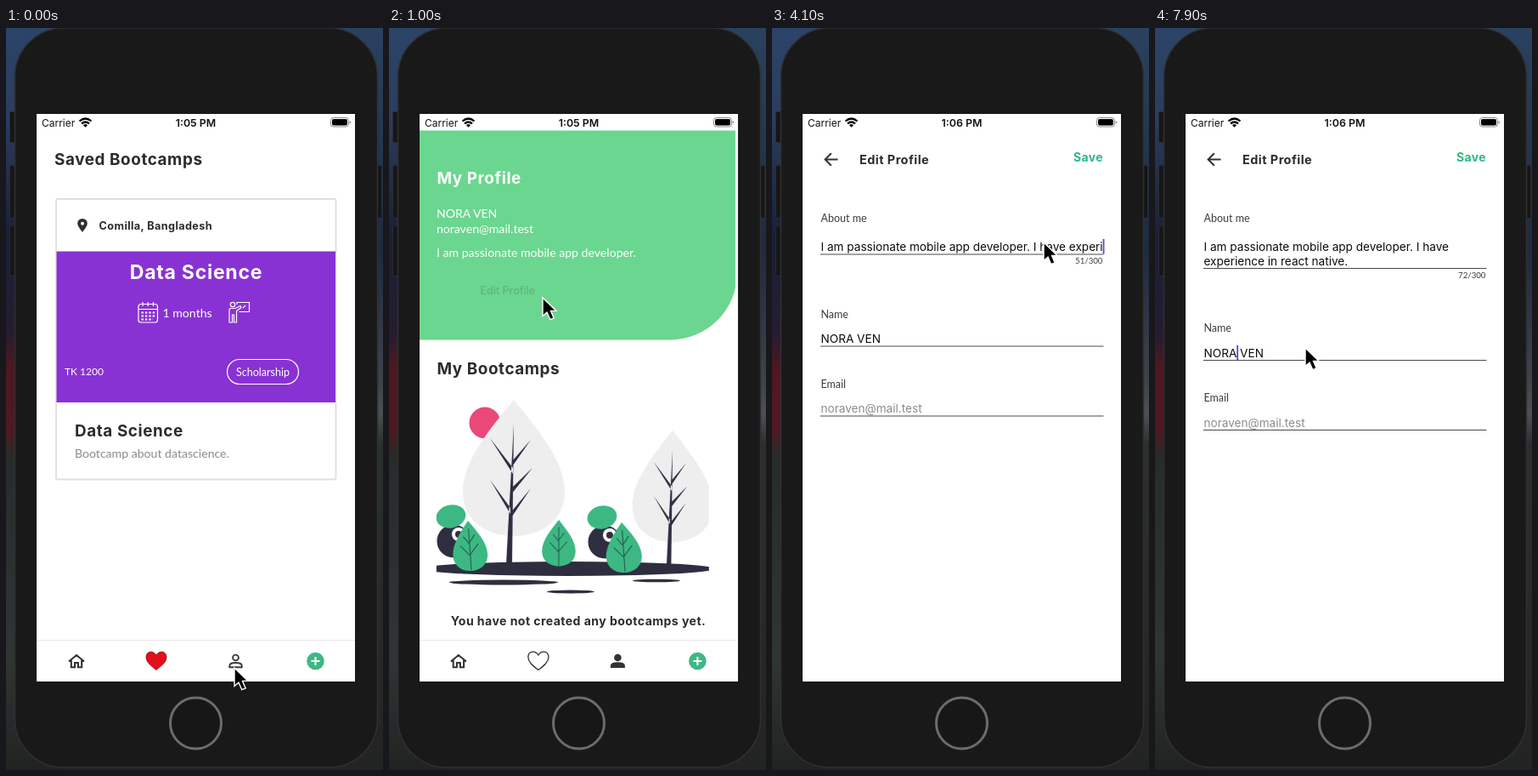
An HTML page for the animation above (8000 ms loop, 444 px wide and 872 px high).

```html
<!DOCTYPE html>
<html lang="en">
<head>
<meta charset="utf-8">
<title>Bootcamp app</title>
<style>
html, body { margin: 0; width: 100%; height: 100%; overflow: hidden; background: #111; }
svg { display: block; width: 444px; height: 872px; }
text { font-family: Inter, sans-serif; fill: #111; white-space: pre; }
.h { font-weight: 700; font-size: 18.9px; letter-spacing: .03em; fill: #2c2c2e; }
.b { font-family: Lato, sans-serif; font-size: 14.1px; }
.label { font-family: Lato, sans-serif; font-size: 12.5px; fill: #3c3c3c; }
.in { font-size: 13.6px; fill: #0c0c0c; }
.w { fill: #fff; }
.icon { fill: none; stroke: #fff; stroke-width: 1.2; }
.rule { stroke: #4a4a4a; stroke-width: 1.1; }
.dark { fill: #2f2e41; }
.green { fill: #3db883; }
.caret { fill: #5a43e0; }

.a { animation: 8s step-end infinite; }
#saved { animation-name: saved; }
#profile { animation-name: profile; }
#early { animation-name: early; }
#late { animation-name: late; }
#aboutCaret { animation-name: aboutCaret; }
#nameEnd { animation-name: nameEnd; }
#nameMid { animation-name: nameMid; }
#under { animation: under 8s infinite; }
#edit { animation: edit 8s infinite; }
#press { animation: press 8s linear infinite; }
#pointer { animation: pointer 8s ease-in-out infinite; }

@keyframes saved { 0% { visibility: visible } 2.5%, 100% { visibility: hidden } }
@keyframes profile { 0% { visibility: hidden } 2.5% { visibility: visible } 18.75%, 100% { visibility: hidden } }
@keyframes early { 0% { visibility: visible } 40%, 100% { visibility: hidden } }
@keyframes late { 0% { visibility: hidden } 40%, 100% { visibility: visible } }
@keyframes aboutCaret { 0% { visibility: hidden } 32.5% { visibility: visible } 93.75%, 100% { visibility: hidden } }
@keyframes nameEnd { 0% { visibility: hidden } 96.25% { visibility: visible } 98.75%, 100% { visibility: hidden } }
@keyframes nameMid { 0% { visibility: hidden } 98.75%, 100% { visibility: visible } }
@keyframes under {
  0%, 12.5% { transform: none; animation-timing-function: cubic-bezier(.2,.8,.2,1) }
  17.5%, 100% { transform: translateX(-112px) }
}
@keyframes edit {
  0%, 12.5% { transform: translateX(376px); animation-timing-function: cubic-bezier(.2,.8,.2,1) }
  17.5%, 100% { transform: none }
}
@keyframes press { 0%, 9.5% { opacity: .6 } 11.25%, 100% { opacity: .16 } }
@keyframes pointer {
  0%, 2.5% { transform: translate(269px, 752px) }
  10.5%, 12.5% { transform: translate(181px, 317px) }
  18%, 22.5% { transform: translate(153px, 420px) }
  31.25%, 83.75% { transform: translate(320px, 252px) }
  93.5%, 100% { transform: translate(177px, 376px) }
}
</style>
</head>
<body>
<svg viewBox="0 0 444 872">
<defs>
  <linearGradient id="left" x2="0" y2="1">
    <stop offset="0" stop-color="#2b4468"/><stop offset=".12" stop-color="#2c3d5e"/>
    <stop offset=".28" stop-color="#182038"/><stop offset=".41" stop-color="#241c30"/>
    <stop offset=".46" stop-color="#4f1820"/><stop offset=".54" stop-color="#501820"/>
    <stop offset=".58" stop-color="#262c2a"/><stop offset=".85" stop-color="#2f3532"/>
    <stop offset="1" stop-color="#202322"/>
  </linearGradient>
  <linearGradient id="right" x2="0" y2="1">
    <stop offset="0" stop-color="#29425f"/><stop offset=".3" stop-color="#1e2a40"/>
    <stop offset=".48" stop-color="#3e444c"/><stop offset=".52" stop-color="#4c5054"/>
    <stop offset=".56" stop-color="#2b302f"/><stop offset="1" stop-color="#222423"/>
  </linearGradient>
  <clipPath id="screen"><rect x="36" y="120.6" width="375" height="647.4"/></clipPath>
  <clipPath id="art"><rect x="57" y="430" width="321" height="240"/></clipPath>
  <path id="leaf" d="M0 0C28 34 60 72 60 108C60 142 32 160 0 160S-60 142-60 108C-60 72-28 34 0 0Z"/>
  <path id="veins" class="dark" d="M0 28L-2 194H-9Z
    M20 47L-1 77V71Z M-28 45L-1 87V80Z M22 80L-3 111V104Z M-28 94L-4 134V127Z M20 104L-4 140V133Z"/>
  <g id="sprout"><use href="#leaf" class="green"/>
    <path d="M0 25V158M0 70L20 45M0 75L-20 50M0 108L30 75M0 112L-32 78" fill="none" stroke="#24594f" stroke-width="3"/></g>
  <g id="buddy">
    <circle class="dark" r="19.5"/>
    <ellipse class="green" cx="-3" cy="-29" rx="17.500" ry="13.500" transform="rotate(-12 -3 -29)"/>
    <circle class="w" cx="6" cy="-8" r="8"/><circle class="dark" cx="6" cy="-8" r="4"/>
  </g>
  <path id="heart" d="M0 10.5C-7 5-12 1-12-4.5C-12-12-3.5-13 0-7C3.5-13 12-12 12-4.5C12 1 7 5 0 10.5Z"/>
</defs>

<rect width="222" height="872" fill="url(#left)"/>
<rect x="222" width="222" height="872" fill="url(#right)"/>
<g fill="#161617" stroke="#2a2a2c">
  <rect x="4.5" y="98.5" width="9" height="36" rx="2"/>
  <rect x="4.5" y="161.5" width="9" height="62" rx="2"/>
  <rect x="4.5" y="232.5" width="9" height="59" rx="2"/>
  <rect x="433" y="161.5" width="9.500" height="62" rx="2"/>
</g>
<rect x="10.500" y="0" width="427" height="869" rx="57" fill="#19191a" stroke="#303032" stroke-width="1.500"/>
<circle cx="223.500" cy="817" r="30" fill="#171718" stroke="#6c6c6e" stroke-width="3"/>
<rect x="36" y="101" width="375" height="667" fill="#fff"/>

<!-- status bar -->
<text x="42" y="115.500" font-size="12">Carrier</text>
<path d="M86.500 109.500Q93.500 103.500 100.500 109.500M89 112.300Q93.500 108.600 98 112.300" fill="none" stroke="#000" stroke-width="2.300"/>
<path d="M91 114.200Q93.500 112 96 114.200L93.500 116.700Z"/>
<g font-size="12.400" font-weight="600" text-anchor="middle">
  <text id="early" class="a" x="223.500" y="115.500">1:05 PM</text>
  <text id="late" class="a" x="223.500" y="115.500">1:06 PM</text>
</g>
<rect x="382.500" y="105.500" width="21" height="10.500" rx="3" fill="none" stroke="#888"/>
<rect x="384" y="107" width="18" height="7.500" rx="1.800"/>
<path d="M404.700 109v3.600q1.500-.5 1.500-1.800t-1.500-1.800" fill="#888"/>

<g clip-path="url(#screen)">
<g id="under">
  <g id="saved" class="a">
    <text class="h" x="57" y="161">Saved Bootcamps</text>
    <rect x="59" y="201" width="329.500" height="329.500" rx="2" fill="#fff" stroke="#dedede" stroke-width="1.800"/>
    <path d="M90 240C86 234.500 84.200 232 84.200 229.700A5.800 5.800 0 0 1 95.800 229.700C95.800 232 94 234.500 90 240Z" fill="#2f2f2f"/>
    <circle class="w" cx="90" cy="229.800" r="2"/>
    <text class="h" x="109.500" y="236.500" style="font-size:12.700px">Comilla, Bangladesh</text>
    <rect x="59.500" y="262.500" width="328.500" height="177.500" fill="#8932d4"/>
    <text class="h" x="224" y="295" text-anchor="middle" style="font-size:23.100px;fill:#fff">Data Science</text>
    <g class="icon">
      <rect x="156" y="324.500" width="22.500" height="21.500" rx="3"/>
      <path d="M156 330.500H178.500M161 322v5M167.200 322v5M173.500 322v5"/>
      <path d="M159.500 334.500H176M159.500 338.500H176M159.500 342.500H173" stroke-width="2.200" stroke-dasharray="2.400 2"/>
      <circle cx="267" cy="325" r="2.700"/>
      <path d="M263 346V331Q263 329.500 264.500 329.500H270L276 326.500L277 328.500L271.500 332.500V346H268.500V337H266.500V346Z"/>
      <path d="M272 325V322.500H286.500V333.500H274.500M279 329l3-3"/>
    </g>
    <text class="b" x="184.500" y="340" style="fill:#fff">1 months</text>
    <text class="b" x="69" y="408" style="font-size:12px;fill:#fff">TK 1200</text>
    <rect class="icon" x="260.500" y="389.500" width="84" height="29" rx="14.500"/>
    <text class="b" x="302.500" y="409" text-anchor="middle" style="font-size:12.500px;fill:#fff">Scholarship</text>
    <text class="h" x="81" y="480">Data Science</text>
    <text class="b" x="81" y="505" style="fill:#8a8a8a">Bootcamp about datascience.</text>
    <use href="#heart" x="177" y="744" fill="#e30f1c" stroke="#8f1a20" stroke-width=".8"/>
    <g fill="none" stroke="#3a3a3a" stroke-width="1.900">
      <circle cx="270.500" cy="740" r="3.400"/>
      <path d="M263.300 751.300V749.500Q263.300 746 270.500 746T277.700 749.500V751.300Z"/>
    </g>
  </g>

  <g id="profile" class="a">
    <path d="M36 120.600H411V288A78.400 78.400 0 0 1 333 366.400H36Z" fill="#6bd68f"/>
    <text class="h" x="57.500" y="182.500" style="fill:#fff">My Profile</text>
    <text class="b" x="57" y="223" style="fill:#fff">NORA VEN</text>
    <text class="b" x="57" y="241" style="fill:#fff">noraven@mail.test</text>
    <text class="b" x="57" y="268.500" style="fill:#fff">I am passionate mobile app developer.</text>
    <g id="press">
      <text x="141" y="313" text-anchor="middle" font-size="12.500" font-weight="500">Edit Profile</text>
    </g>
    <text class="h" x="57.500" y="407">My Bootcamps</text>
    <g clip-path="url(#art)">
      <circle cx="114" cy="464" r="18.500" fill="#e94878"/>
      <ellipse class="dark" cx="212" cy="635.500" rx="172" ry="8.500"/>
      <g class="dark">
        <ellipse cx="136" cy="651.500" rx="64" ry="3"/>
        <ellipse cx="215" cy="662.500" rx="28" ry="2"/>
        <ellipse cx="316" cy="649.500" rx="28" ry="1.800"/>
      </g>
      <g transform="translate(148 437)"><use href="#leaf" fill="#eeeeef"/><use href="#veins"/></g>
      <g transform="translate(335 473) scale(.79 .82)"><use href="#leaf" fill="#eeeeef"/><use href="#veins"/></g>
      <use href="#buddy" x="77" y="603"/>
      <use href="#buddy" x="255" y="604"/>
      <use href="#sprout" transform="translate(94 579) rotate(-4) scale(.34 .37)"/>
      <use href="#sprout" transform="translate(201 578) scale(.33 .34)"/>
      <use href="#sprout" transform="translate(275 581) rotate(-4) scale(.35 .37)"/>
    </g>
    <text class="h" x="224" y="702" text-anchor="middle" style="font-size:14.100px">You have not created any bootcamps yet.</text>
    <rect x="36" y="719" width="375" height="49" fill="#fff"/>
    <use href="#heart" x="177" y="744" fill="none" stroke="#333" stroke-width="1.300"/>
    <g fill="#333"><circle cx="270.500" cy="740" r="4.300"/>
      <path d="M262 752V749.500Q262 745.300 270.500 745.300T279 749.500V752Z"/></g>
  </g>

  <path d="M36 719.500H411" stroke="#e6e6e6"/>
  <path d="M74 744.500L83 737L92 744.500M76.800 743V751.300H81V746H85V751.300H89.200V743" fill="none" stroke="#333" stroke-width="2.100"/>
  <circle class="green" cx="364.500" cy="744" r="10.300"/>
  <path d="M364.500 739V749M359.500 744H369.500" stroke="#fff" stroke-width="2"/>
</g>

<g id="edit">
  <rect x="36" y="120" width="375" height="648" fill="#fff"/>
  <path d="M77.500 154.500H63M69.800 147.300L62.600 154.500L69.800 161.700" fill="none" stroke="#333" stroke-width="2"/>
  <text class="h" x="103" y="159.800" style="font-size:14.500px">Edit Profile</text>
  <text class="h" x="390" y="157" text-anchor="end" style="font-size:13.900px;fill:#2bb980">Save</text>
  <text class="label" x="57.500" y="227.500">About me</text>
  <text class="in" id="line1" x="57.500" y="262"></text>
  <text class="in" id="line2" x="57.500" y="278.500"></text>
  <rect id="aboutCaret" class="a caret" y="248" width="1.800" height="17.500"/>
  <g id="lower">
    <path class="rule" d="M57 266H390.500"/>
    <text class="label" id="count" x="389.500" y="277.300" text-anchor="end" style="font-size:9.700px"></text>
    <text class="label" x="57.500" y="340.500">Name</text>
    <text class="in" id="name" x="57.500" y="370">NORA VEN</text>
    <rect id="nameEnd" class="a caret" y="356.500" width="1.800" height="17"/>
    <rect id="nameMid" class="a caret" y="356.500" width="1.800" height="17"/>
    <path class="rule" d="M57 374H390.500"/>
    <text class="label" x="57.500" y="422.500">Email</text>
    <text class="in" x="57.500" y="452" style="fill:#8b8b8b">noraven@mail.test</text>
    <path class="rule" d="M57 456H390.500"/>
  </g>
</g>
</g>

<g id="pointer">
  <path d="M0 0V21.500L5 17.100L8.800 25.700L13.100 23.800L9.500 15.400H16Z" fill="#000" stroke="#fff" stroke-width="1.400"/>
</g>
</svg>
<script>
const $ = id => document.getElementById(id);
const bio = 'I am passionate mobile app developer. I have experience in react native.';
const START = 37, WRAP = 51, BREAK = bio.indexOf('experience');
const LOOP = 8000, KEY = 100, TYPE_AT = 2700;
let origin, shown = -1;

function caretTo(caret, line, chars) {
  caret.setAttribute('x', 57.5 + line.getSubStringLength(0, chars));
}

function draw(n) {
  const wrapped = n > WRAP;
  const line = $(wrapped ? 'line2' : 'line1');
  const shift = `translate(0 ${wrapped ? 16.5 : 0})`;
  $('line1').textContent = bio.slice(0, wrapped ? BREAK : n);
  $('line2').textContent = wrapped ? bio.slice(BREAK, n) : '';
  $('count').textContent = n + '/300';
  $('lower').setAttribute('transform', shift);
  $('aboutCaret').setAttribute('transform', shift);
  caretTo($('aboutCaret'), line, line.textContent.length);
}

function tick(now) {
  origin ??= now;
  const t = (now - origin) % LOOP;
  const typed = Math.max(0, Math.floor((t - TYPE_AT) / KEY));
  const n = Math.min(bio.length, START + typed);
  if (n !== shown) draw(shown = n);
  requestAnimationFrame(tick);
}

caretTo($('nameEnd'), $('name'), 8);
caretTo($('nameMid'), $('name'), 4);
draw(START);
requestAnimationFrame(tick);
</script>
</body>
</html>
```
